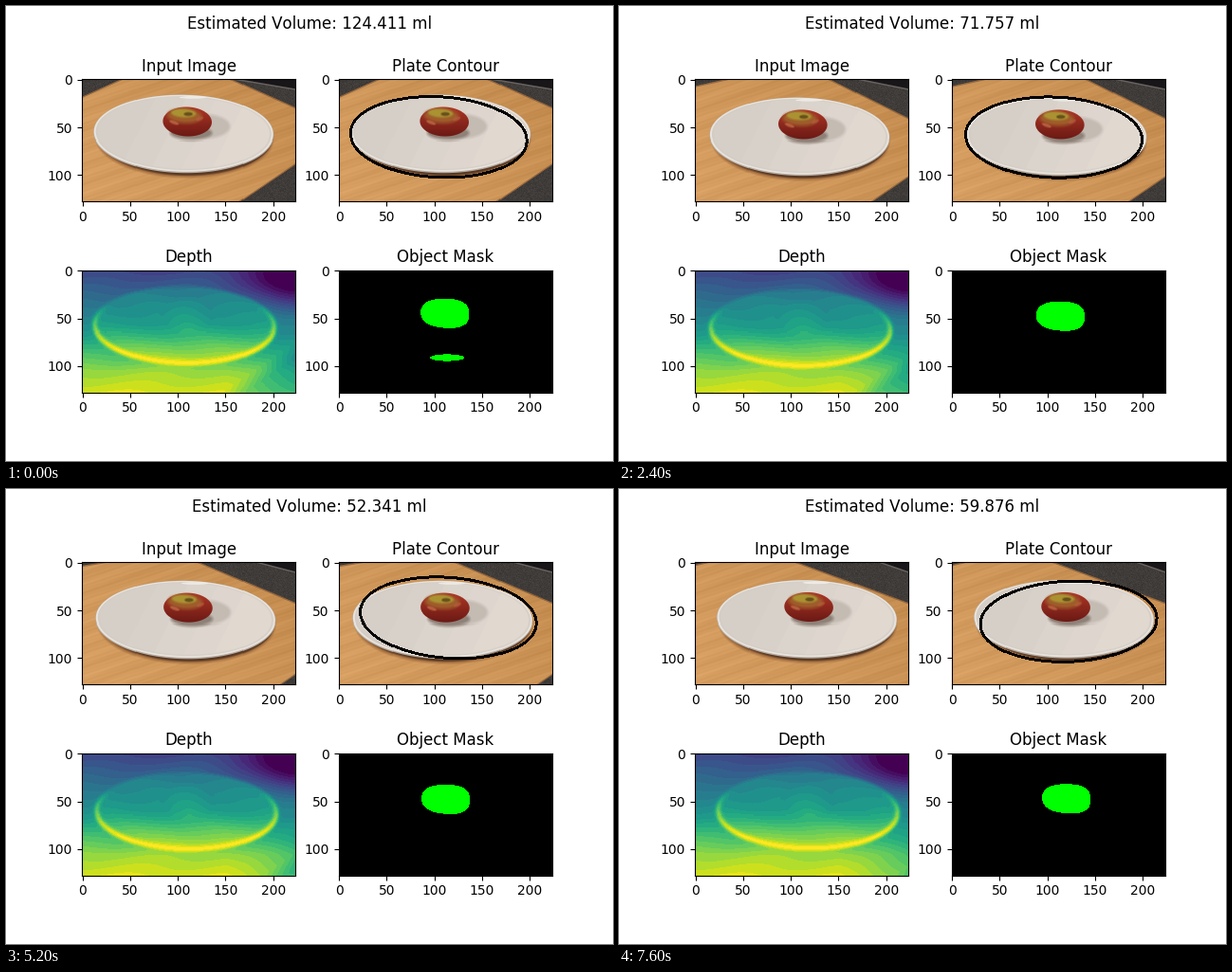
Animation of 640 by 480 pixels, one loop 8000 ms. Source, as a matplotlib script:

```python
import numpy as np
import matplotlib.pyplot as plt
from matplotlib.animation import FuncAnimation

plt.rcParams["font.family"] = "DejaVu Sans"
plt.rcParams["text.kerning_factor"] = 6

W, H = 224, 128
FRAMES, INTERVAL = 20, 400
Y, X = np.mgrid[0:H, 0:W].astype(float)

# Measured readings at a few moments; the rest is interpolated.
TIMES = (0, 4, 6, 10, 13, 17, 19)
VOLUME = (124.411, 145.247, 71.757, 59.163, 52.341, 32.964, 59.876)
RING_SHIFT = (-2, 1.5, -3, -5, 6, -5.5, 5)
RING_TILT = (3, 0, 2, 2.8, 4.5, 7, -2.3)


class Pose:
    """Camera drift and detector wobble at step n."""

    def __init__(self, n):
        t = n / (FRAMES - 1)
        self.n = n
        self.x = 105.7 + 10 * t ** 2 + 2.6 * np.sin(2 * np.pi * n / 18)
        self.y = 56.9 + 4 * t + 1.7 * np.sin(2 * np.pi * n / 28)
        self.apple_x = self.x + 4 - 2 * t
        self.apple_y = self.y - 12.4
        self.ring_x = self.x + np.interp(n, TIMES, RING_SHIFT)
        self.ring_y = self.y + 0.5 + 3 * np.cos(2 * np.pi * (n - 1) / 21)
        self.ring_tilt = np.interp(n, TIMES, RING_TILT)
        self.volume = np.interp(n, TIMES, VOLUME)

        board_x, board_y = 157 - 50 * t, 30 + 13 * (1 - np.exp(-n / 3))
        left_x, left_y = 40 - 30 * t, 2 + 16 * np.exp(-n / 5)
        # Positive inside the board, one value per visible edge.
        self.back = Y - board_y * (X - board_x) / (W - board_x)
        self.left = Y - left_y * (1 - X / left_x)
        self.front = 88 + 42 * t + 0.68 * (W - X) - Y
        black_x = 165 + 30 * t
        self.black = Y - 10 * (X - black_x) / (W - black_x)


def ellipse(cx, cy, a, b, tilt=0.0):
    """Normalised radius: 1 on the outline."""
    t = np.radians(tilt)
    dx, dy = X - cx, Y - cy
    u = dx * np.cos(t) + dy * np.sin(t)
    v = dy * np.cos(t) - dx * np.sin(t)
    return np.hypot(u / a, v / b)


def distance(r):
    """Approximate signed pixel distance to the outline."""
    gy, gx = np.gradient(r)
    return (r - 1) / (np.hypot(gx, gy) + 1e-6)


def cover(dist, soft=1.0):
    return np.clip(0.5 - dist / soft, 0, 1)


def paint(img, color, alpha):
    img += (np.asarray(color, float) - img) * alpha[..., None]


def paint_ellipse(img, color, *shape, soft=1.0, opacity=1.0):
    paint(img, color, opacity * cover(distance(ellipse(*shape)), soft))


def draw_table(img, p):
    across = Y + 0.35 * X
    grain = (np.sin(across * 0.33) + 0.6 * np.sin(across * 0.9 + 0.02 * X)
             + 0.5 * np.sin(across * 1.7 - 0.05 * X))
    img[:] = (205, 149, 88)
    img += (grain * 3.5 + (110 - X) * 0.06 + (Y - 64) * 0.06)[..., None]

    rng = np.random.default_rng(4)
    slate = np.array((64, 60, 58)) + rng.normal(0, 4, (H, W, 1))
    for edge in (p.back, p.left, p.front):
        paint(img, (128, 86, 52), 0.7 * cover(edge - 1.5))
        paint(img, slate, cover(edge))
    paint(img, (104, 99, 96), cover(p.black - 1.5))
    paint(img, (24, 22, 24), cover(p.black))


def draw_plate(img, p):
    x, y = p.x, p.y
    paint_ellipse(img, (150, 98, 55), x + 1, y + 4, 92, 41, 1, soft=4)
    paint_ellipse(img, (88, 57, 36), x + 2, y + 2.5, 90.5, 40.8, 1, soft=2)
    paint_ellipse(img, (180, 170, 160), x, y, 94, 40.8, 1)
    paint_ellipse(img, (232, 227, 221), x, y - 0.6, 93.5, 40, 1)
    paint_ellipse(img, (211, 204, 196), x, y - 0.8, 91.5, 38.4, 1)

    step = np.clip(np.floor((X - x + 0.5 * (Y - y)) / 32 + 2.5), 0, 4)
    tone = np.array((214, 207, 200)) + step[..., None] * (2.8, 2.6, 2.2)
    paint(img, tone, cover(distance(ellipse(x, y - 1, 90, 37.6, 1)), 2))
    paint_ellipse(img, (240, 237, 233), x + 10, y - 38, 14, 1.3, opacity=0.9)


def draw_apple(img, p):
    x, y = p.apple_x, p.apple_y
    paint_ellipse(img, (190, 181, 173), x + 17, y + 5, 28, 13, soft=4, opacity=0.8)
    paint_ellipse(img, (142, 129, 120), x + 4, y + 12, 22, 7, soft=4)

    shade = np.clip((Y - y) / 15, -1, 1)[..., None]
    red = np.array((140, 40, 29)) - shade * (32, 14, 8)
    body = ellipse(x, y, 25.8, 15.5, 2)
    paint(img, red, cover(distance(body)))
    paint_ellipse(img, (158, 92, 42), x - 3, y - 6, 18, 7.5, 3, soft=5)
    paint_ellipse(img, (170, 146, 50), x - 4, y - 9, 13, 4.5, 3, soft=3)
    paint_ellipse(img, (104, 80, 28), x + 1, y - 8, 4.5, 2, soft=2)
    paint_ellipse(img, (196, 112, 76), x - 14, y + 1, 5, 1.7, 20, soft=2, opacity=0.7)
    paint_ellipse(img, (188, 96, 66), x + 13, y - 3, 4, 1.7, -20, soft=2, opacity=0.6)


def photo(p):
    img = np.zeros((H, W, 3))
    draw_table(img, p)
    draw_plate(img, p)
    draw_apple(img, p)
    return np.clip(img, 0, 255).astype(np.uint8)


def outlined(img, p):
    ring = ellipse(p.ring_x, p.ring_y, 92, 42, p.ring_tilt)
    out = img.copy()
    out[np.abs(distance(ring)) < 1.5] = 0
    return out


def depth(p):
    field = np.interp(Y, [0, 40, 65, 105, 127], [0.2, 0.42, 0.53, 0.85, 0.94])
    field -= 0.34 * np.exp(-((X - 222) / 50) ** 2 - ((Y - 14) / 26) ** 2)
    field -= 0.14 * np.clip((X - 150) / 74, 0, 1) * np.clip((Y - 50) / 40, 0, 1)
    field -= 0.12 * cover(p.front - 6, 16)
    field += 0.015 * np.sin(X / 17 + Y / 11)

    a, b = 96, 41
    v = (Y - p.y - 0.5) / b
    inside = np.interp(v, [-1, -0.6, 0, 0.5, 1], [0.40, 0.47, 0.56, 0.76, 0.94])
    inside += 0.012 * np.sin(X / 14 - Y / 9)
    bump = ellipse(p.apple_x, p.apple_y + 2, 28, 17)
    inside += 0.035 * cover(distance(bump), 6) * np.cos((X - p.apple_x) / 13)

    edge = distance(ellipse(p.x + 1, p.y + 0.5, a, b, 1))
    field += (inside - field) * cover(edge, 4)
    rim = np.exp(-((edge + 2.5) / 3.2) ** 2) * np.clip(0.45 + 0.85 * v, 0, 1)
    field += (1 - field) * rim
    return np.round(np.clip(field, 0, 1) * 26) / 26


def mask(p):
    dx, dy = X - p.apple_x - 0.5, Y - p.apple_y - 0.2
    dy = dy - 0.07 * dx * (dy > 0)
    on = np.abs(dx / 25.5) ** 2.5 + np.abs(dy / 15.4) ** 2.5 < 1
    if p.n < 5:
        grow = p.n / 4
        on |= ellipse(112.7 + 2.7 * grow, 90.5 + 2 * grow,
                      18 + 6 * grow, 3.6 + grow) < 1
    img = np.zeros((H, W, 3), np.uint8)
    img[on, 1] = 255
    return img


def panels(p):
    img = photo(p)
    return img, outlined(img, p), depth(p), mask(p)


fig, axes = plt.subplots(2, 2, figsize=(6.4, 4.8), dpi=100)
title = fig.suptitle("")
views = []
names = ("Input Image", "Plate Contour", "Depth", "Object Mask")
for ax, name, data in zip(axes.flat, names, panels(Pose(0))):
    ax.set_title(name)
    views.append(ax.imshow(data, cmap="viridis", vmin=0, vmax=1,
                           interpolation="nearest"))


def update(n):
    p = Pose(n)
    title.set_text(f"Estimated Volume: {p.volume:.3f} ml")
    for view, data in zip(views, panels(p)):
        view.set_data(data)
    return [title, *views]


anim = FuncAnimation(fig, update, frames=FRAMES, interval=INTERVAL, repeat=True)
plt.show()
```
